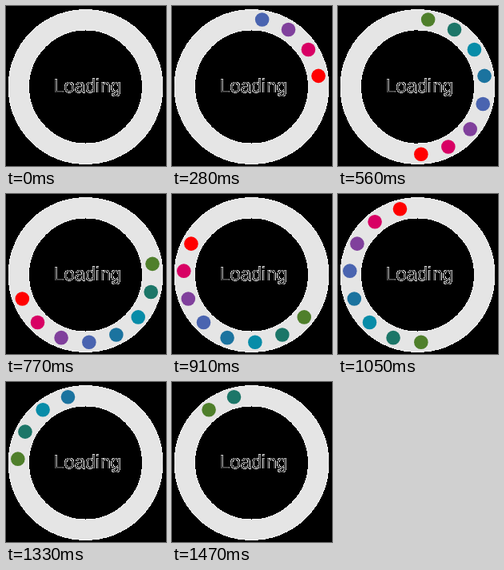
These frames come from a looping animation (200x200 px, 1540 ms). An HTML page:

```html
<!DOCTYPE html>
<html lang="en">
<head>
<meta charset="utf-8">
<title>Loading</title>
<style>
  html, body { margin: 0; width: 100%; height: 100%; overflow: hidden; background: #000; }
  svg { display: block; width: 100vw; height: 100vh; }
  text {
    font: 23.8px "Liberation Sans", Arial, sans-serif;
    text-rendering: geometricPrecision;
    fill: #333;
  }
</style>
</head>
<body>
<svg viewBox="0 0 200 200">
  <!-- White matte: soft edges blend into white and end hard against the backdrop -->
  <filter id="matte" color-interpolation-filters="sRGB">
    <feColorMatrix values="0 0 0 0 1  0 0 0 0 1  0 0 0 0 1  0 0 0 255 0" result="white"/>
    <feMerge>
      <feMergeNode in="white"/>
      <feMergeNode in="SourceGraphic"/>
    </feMerge>
  </filter>
  <g filter="url(#matte)">
    <circle cx="99.5" cy="101" r="83.75" fill="none" stroke="#e5e5e5" stroke-width="25.5"/>
    <text x="59.4" y="107.5" transform="rotate(.02)">Loading</text>
  </g>
  <g id="dots"></g>
</svg>
<script>
  const STEP = 70, STEPS = 22, SLOTS = 15, RADIUS = 84.7;
  const COLORS = ['#ff0000', '#d80064', '#80409c', '#4a64b0',
                  '#1b739f', '#088ca8', '#1c7668', '#4f7f2b'];
  const group = document.getElementById('dots');

  const dots = COLORS.map(color => {
    const dot = document.createElementNS('http://www.w3.org/2000/svg', 'circle');
    dot.setAttribute('r', 8.8);
    dot.setAttribute('fill', color);
    return group.appendChild(dot);
  });

  // The dots enter one by one at the top, circle once and leave.
  function draw(time) {
    const step = Math.floor(time / STEP) % STEPS;
    dots.forEach((dot, i) => {
      const slot = step - 1 - i;
      const angle = (9 + slot * 360 / SLOTS) * Math.PI / 180;
      dot.setAttribute('cx', 99.4 + RADIUS * Math.sin(angle));
      dot.setAttribute('cy', 100.6 - RADIUS * Math.cos(angle));
      dot.style.display = slot >= 0 && slot < SLOTS ? '' : 'none';
    });
  }

  const start = performance.now();
  function tick() {
    draw(performance.now() - start);
    requestAnimationFrame(tick);
  }
  tick();
</script>
</body>
</html>
```
